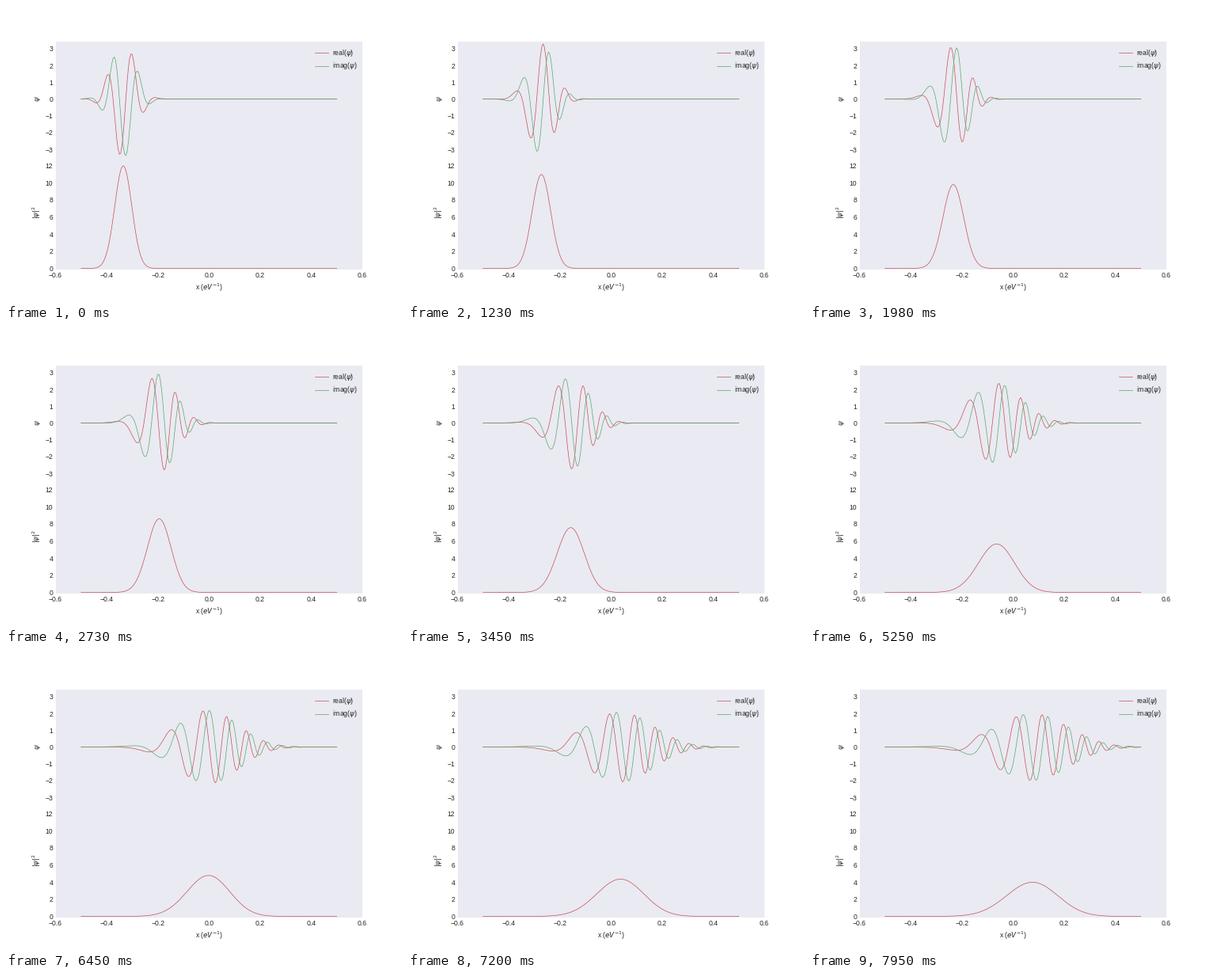
A matplotlib script for the animation above (7.98 s loop, 500 by 374 pixels).

```python
import numpy as np
import matplotlib.pyplot as plt
from matplotlib.animation import FuncAnimation
from matplotlib.lines import Line2D

W, H, DPI = 500, 374, 62.5
FRAMES, INTERVAL = 266, 30
RED, GREEN, INK, PANEL = "#C44E52", "#55A868", "#262626", "#EAEAF2"
LW = 0.8

plt.rcParams.update({
    "font.family": "Liberation Sans", "font.size": 10,
    "text.color": INK, "axes.labelcolor": INK,
    "xtick.color": INK, "ytick.color": INK,
})

# Gaussian packet on a lattice, as a sum of plane waves
DX = 0.005
X0, SIGMA, K0 = -0.335, 1 / 30, 20 * np.pi
x = np.linspace(-0.5, 0.5, 201)
k = K0 + np.linspace(-6, 6, 241) / (2 * SIGMA)
weight = np.exp(-((k - K0) * SIGMA) ** 2)
weight *= (2 * np.pi * SIGMA**2) ** -0.25 / weight.sum()
waves = np.exp(1j * (np.outer(x - X0, k) + K0 * X0))
omega = 1 - np.cos(k * DX)  # phase advance per step


def psi(step):
    return waves @ (weight * np.exp(-1j * omega * step))


fig, (top, low) = plt.subplots(2, 1, sharex=True, figsize=(W / DPI, H / DPI), dpi=DPI)
fig.subplots_adjust(left=0.125, right=0.9, bottom=0.11, top=0.88, hspace=0)
fig.patch.set_facecolor("white")

for ax in (top, low):
    ax.set_facecolor(PANEL)
    ax.tick_params(length=0, labelsize=10)
    for spine in ax.spines.values():
        spine.set_visible(False)

top.set_xlim(-0.6, 0.6)
top.set_ylim(-3.36, 3.42)
top.set_yticks(range(-3, 4))
top.set_ylabel(r"$\psi$")
top.tick_params(labelbottom=False)

low.set_ylim(-0.12, 13.17)
low.set_yticks(range(0, 13, 2))
low.set_xticks(np.linspace(-0.6, 0.6, 7))
low.tick_params(axis="x", pad=4)
low.set_ylabel(r"$|\psi|^2$")
low.set_xlabel(r"x ($eV^{-1}$)")

real_line, = top.plot([], [], color=RED, lw=LW)
imag_line, = top.plot([], [], color=GREEN, lw=LW)
prob_line, = low.plot([], [], color=RED, lw=LW)


def legend_row(y, color, name):
    yf = 1 - y / H
    fig.add_artist(Line2D([390 / W, 406.5 / W], [yf, yf], color=color, lw=LW))
    fig.text(412.5 / W, yf - 3 / H, name + r"($\psi$)", va="baseline")


legend_row(58.5, RED, "real")
legend_row(75.5, GREEN, "imag")


def update(step):
    p = psi(step)
    real_line.set_data(x, p.real)
    imag_line.set_data(x, p.imag)
    prob_line.set_data(x, np.abs(p) ** 2)
    return real_line, imag_line, prob_line


anim = FuncAnimation(fig, update, frames=FRAMES, interval=INTERVAL,
                     repeat=True, repeat_delay=0)
plt.show()
```
